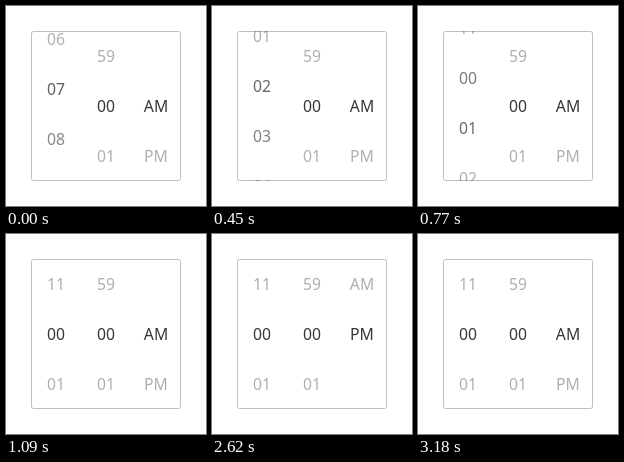
An HTML page with a canvas that plays this animation: 200 px wide and 200 px high, repeating every 4880 ms.

```html
<!DOCTYPE html>
<html lang="en">
<head>
<meta charset="utf-8">
<title>Time tumbler</title>
<style>
  html, body { margin: 0; width: 100%; height: 100%; overflow: hidden; background: #fff; }
  canvas { display: block; }
</style>
</head>
<body>
<canvas id="stage" width="200" height="200"></canvas>
<script>
const LOOP = 4880, ROW = 50, MIDDLE = 100;
const ctx = document.getElementById('stage').getContext('2d');

const clamp = x => Math.min(1, Math.max(0, x));
const easeInOut = x => x < 0.5 ? 2 * x * x : 1 - 2 * (1 - x) ** 2;
const wrap = (n, size) => (n % size + size) % size;
const twoDigits = size => n => String(wrap(n, size)).padStart(2, '0');
const halfDay = n => ['AM', 'PM'][n] || '';

// The picture advances every 40 ms, with a slight drift over the loop.
function snapTime(t) {
  const phase = t < 250 ? 0 : t < 1100 ? 10 : 20;
  return Math.floor((t - phase) / 40) * 40 + phase;
}

// Each position is the row index that sits in the middle of the column.
const hourPosition = t => 7.34 * (1 - clamp(t / 1090)) ** 2.1;
const turn = (t, start) => easeInOut(clamp((t - start) / 275));
const halfDayPosition = t => turn(t, 2332) - turn(t, 2892);

function drawColumn(x, position, label) {
  const nearest = Math.round(position);
  for (let row = nearest - 2; row <= nearest + 2; row++) {
    const offset = row - position;
    ctx.globalAlpha = 0.4 + 0.6 * Math.max(0, 1 - Math.abs(offset));
    ctx.fillText(label(row), x, Math.round(MIDDLE + offset * ROW) + 6);
  }
}

function draw(t) {
  ctx.fillStyle = '#fff';
  ctx.fillRect(0, 0, 200, 200);
  ctx.strokeStyle = '#bdbebf';
  ctx.beginPath();
  ctx.roundRect(25.5, 25.5, 149, 149, 2);
  ctx.stroke();

  ctx.save();
  ctx.beginPath();
  ctx.rect(25, 25, 150, 150);
  ctx.clip();
  ctx.fillStyle = '#353637';
  ctx.font = '15.75px "Noto Sans", "Open Sans", sans-serif';
  ctx.textAlign = 'center';
  drawColumn(50, hourPosition(t), twoDigits(12));
  drawColumn(100, 0, twoDigits(60));
  drawColumn(150, halfDayPosition(t), halfDay);
  ctx.restore();
}

function tick() {
  draw(snapTime(performance.now() % LOOP));
  requestAnimationFrame(tick);
}
tick();
</script>
</body>
</html>
```
